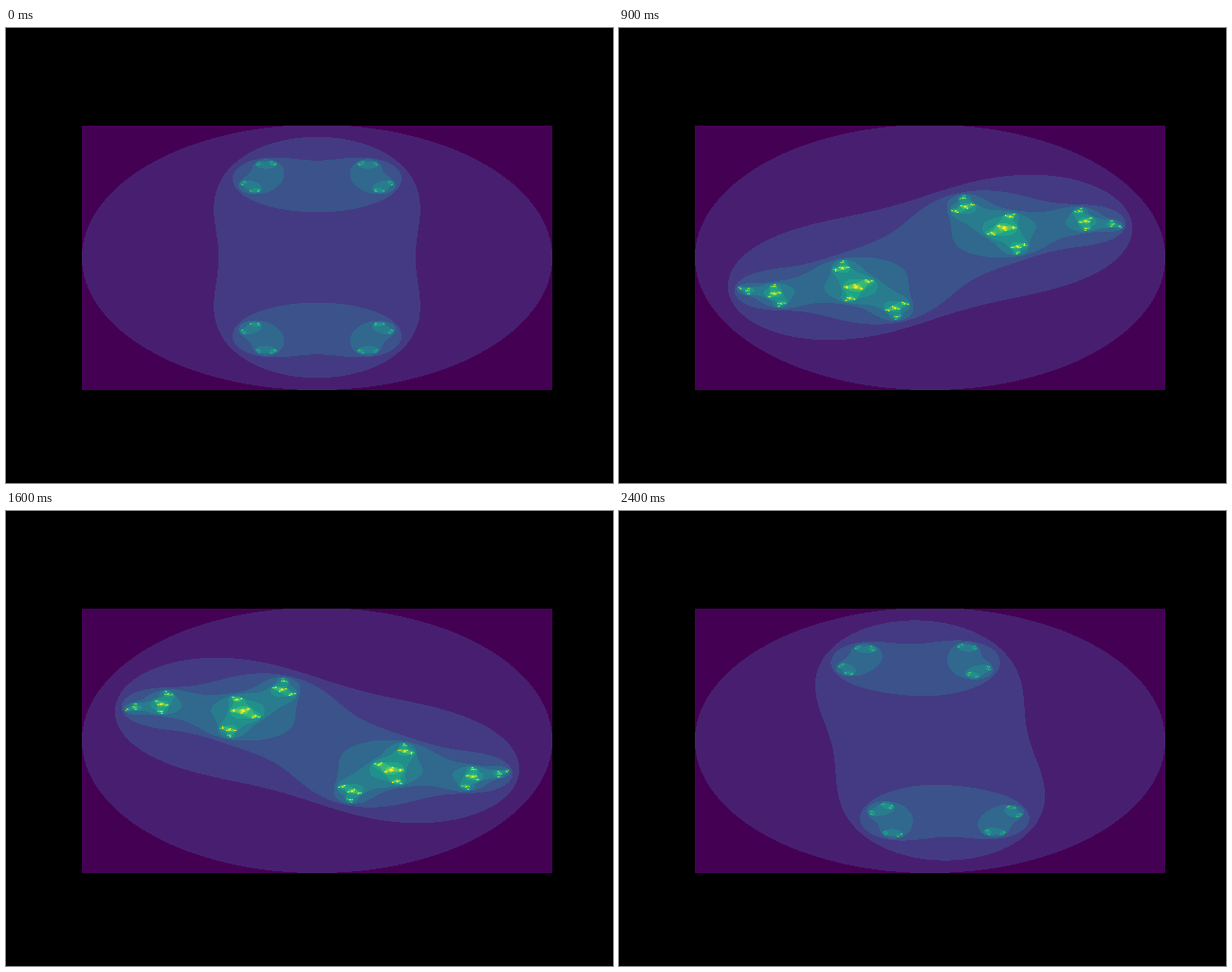
Animation, 640 px wide and 480 px high, one loop 2.5 s. Source, as an HTML page with a canvas:

```html
<!DOCTYPE html>
<html lang="en">
<head>
<meta charset="utf-8">
<title>Julia sets</title>
<style>
  html, body { margin: 0; width: 100%; height: 100%; overflow: hidden; background: #000; }
  canvas { display: block; width: 640px; height: 480px; }
</style>
</head>
<body>
<canvas id="stage" width="640" height="480"></canvas>
<script>
const STEPS = 25, STEP_MS = 100, RADIUS = 1.3;
const LEFT = 80, TOP = 103, W = 496, H = 279;
const CX = 328, CY = 242, SX = 124, SY = 70; // pixels per unit

// Viridis, one colour per escape count
const palette = ['440154', '481f70', '443a83', '3b528b', '31688e', '287c8e', '21908c',
  '20a486', '35b779', '5dc863', '8fd744', 'c7e020', 'fde725']
  .map(h => [0, 2, 4].map(i => parseInt(h.slice(i, i + 2), 16)));
const LIMIT = palette.length - 1;

const ctx = document.getElementById('stage').getContext('2d');
ctx.fillStyle = '#000';
ctx.fillRect(0, 0, 640, 480);

function escapeCount(x, y, a, b) {
  let n = 0;
  while (n < LIMIT && x * x + y * y <= 4) {
    const t = x * x - y * y + a;
    y = 2 * x * y + b;
    x = t;
    n++;
  }
  return n;
}

function render(step) {
  const angle = 2 * Math.PI * step / STEPS;
  const a = RADIUS * Math.cos(angle), b = RADIUS * Math.sin(angle);
  const img = ctx.createImageData(W, H);
  let p = 0;
  for (let j = 0; j < H; j++) {
    const y = (TOP + j + 0.5 - CY) / SY;
    for (let i = 0; i < W; i++) {
      const x = (LEFT + i + 0.5 - CX) / SX;
      const rgb = palette[escapeCount(x, y, a, b)];
      img.data[p++] = rgb[0];
      img.data[p++] = rgb[1];
      img.data[p++] = rgb[2];
      img.data[p++] = 255;
    }
  }
  return img;
}

const cache = [];
let shown = -1;

function show(step) {
  if (step === shown) return;
  shown = step;
  cache[step] = cache[step] || render(step);
  ctx.putImageData(cache[step], LEFT, TOP);
}

const start = performance.now();
function tick() {
  const t = Math.max(0, performance.now() - start);
  show(Math.floor(t / STEP_MS) % STEPS);
  requestAnimationFrame(tick);
}
tick();
</script>
</body>
</html>
```
